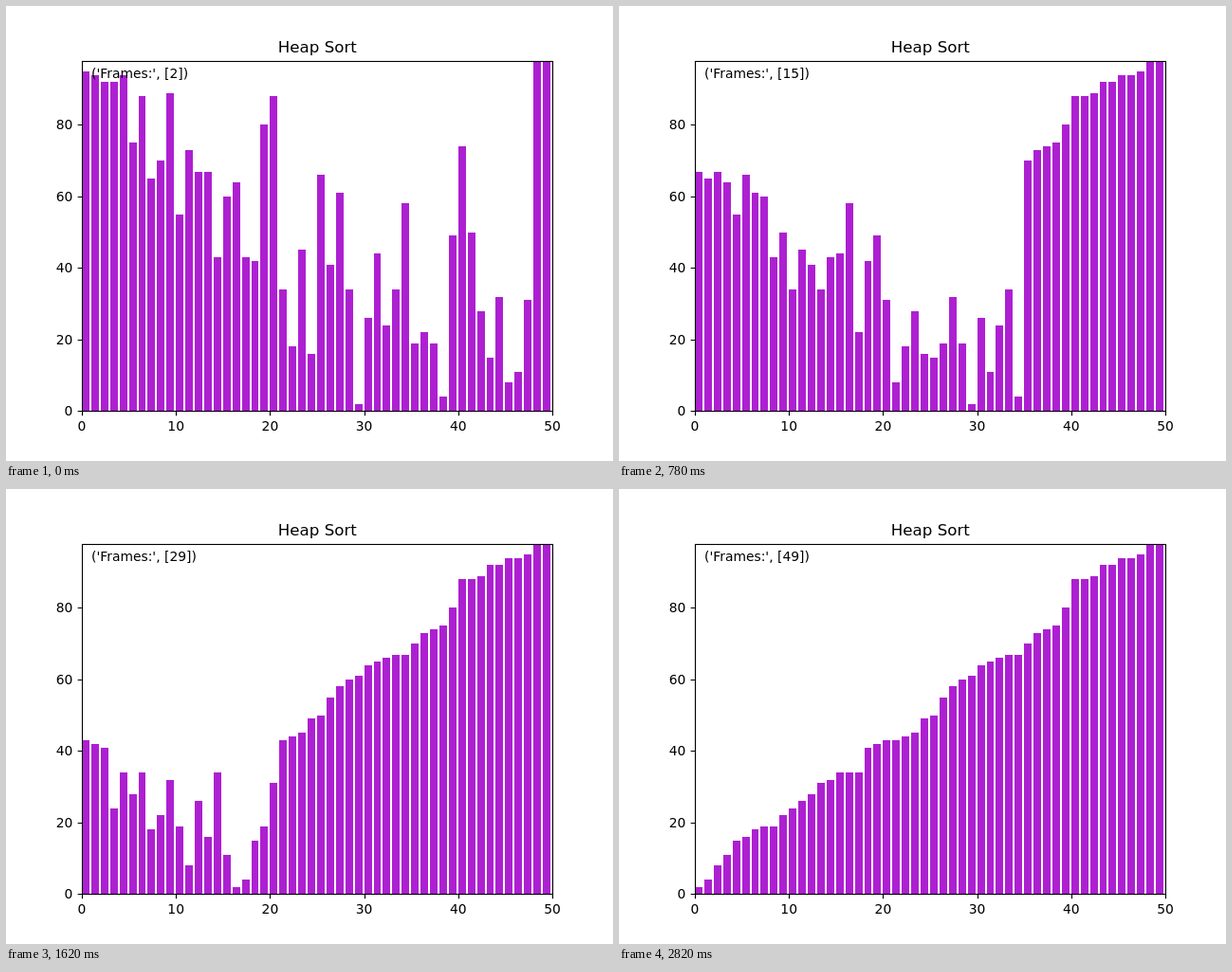
Write an HTML page that moves like this. It is 640 px wide and 480 px high and loops after 2880 ms.

```html
<!DOCTYPE html>
<html lang="en">
<head>
<meta charset="utf-8">
<title>Heap Sort</title>
<style>
  html, body { margin: 0; width: 100%; height: 100%; overflow: hidden; background: #fff; }
  svg { display: block; width: 640px; height: 480px; }
  text { font: 13.889px "DejaVu Sans", Verdana, sans-serif; fill: #000; }
  .title { font-size: 16.667px; }
  .axes { fill: none; stroke: #000; stroke-width: 1.111; }
</style>
</head>
<body>
<svg viewBox="0 0 640 480">
  <g id="bars" fill="#ad20d1"></g>
  <path id="ticks" class="axes"/>
  <rect class="axes" x="80.5" y="58.5" width="496" height="369"/>
  <g id="labels"></g>
  <text class="title" x="328.3" y="49" text-anchor="middle">Heap Sort</text>
  <text id="counter" x="90" y="76"></text>
</svg>
<script>
const STEP = 60;
const FIRST_LABEL = 2;
const LEFT = 80, BOTTOM = 427.2, UNIT_X = 9.92, UNIT_Y = 369.6 / 98;

// A max-heap of 48 values followed by two already sorted ones.
const start = [
  95, 94, 92, 92, 94, 75, 88, 65, 70, 89,
  55, 73, 67, 67, 43, 60, 64, 43, 42, 80,
  88, 34, 18, 45, 16, 66, 41, 61, 34, 2,
  26, 44, 24, 34, 58, 19, 22, 19, 4, 49,
  74, 50, 28, 15, 32, 8, 11, 31, 98, 98
];

const byId = id => document.getElementById(id);
const xAt = i => LEFT + i * UNIT_X;
const yAt = v => BOTTOM - v * UNIT_Y;

function add(parent, tag, attrs, text = "") {
  const node = document.createElementNS("http://www.w3.org/2000/svg", tag);
  for (const key in attrs) node.setAttribute(key, attrs[key]);
  node.textContent = text;
  return parent.appendChild(node);
}

function swap(a, i, j) {
  [a[i], a[j]] = [a[j], a[i]];
}

function siftDown(a, size, root) {
  let largest = root;
  for (const child of [2 * root + 1, 2 * root + 2]) {
    if (child < size && a[child] > a[largest]) largest = child;
  }
  if (largest !== root) {
    swap(a, root, largest);
    siftDown(a, size, largest);
  }
}

function sortStates() {
  const a = [...start];
  const states = [[...a]];
  for (let end = 47; end > 0; end--) {
    swap(a, 0, end);
    siftDown(a, end, 0);
    states.push([...a]);
  }
  return states;
}

function drawAxes() {
  const labels = byId("labels");
  let path = "";
  for (let v = 0; v <= 50; v += 10) {
    path += `M${Math.round(xAt(v)) + 0.5} 427.5v4.86`;
    add(labels, "text", { x: xAt(v), y: 448, "text-anchor": "middle" }, v);
  }
  for (let v = 0; v <= 80; v += 20) {
    const y = Math.round(yAt(v));
    path += `M80.5 ${y + 0.5}h-4.86`;
    add(labels, "text", { x: 70.3, y: y + 5, "text-anchor": "end" }, v);
  }
  byId("ticks").setAttribute("d", path);
}

const states = sortStates();
const bars = start.map((_, i) => {
  const x = Math.round(xAt(i));
  return add(byId("bars"), "rect", { x, width: Math.round(xAt(i + 0.8)) - x });
});
let shown = -1;

function render(time) {
  const index = Math.floor(time / STEP) % states.length;
  if (index === shown) return;
  shown = index;
  states[index].forEach((value, i) => {
    const y = Math.round(yAt(value));
    bars[i].setAttribute("y", y);
    bars[i].setAttribute("height", 427 - y);
  });
  byId("counter").textContent = `('Frames:', [${index + FIRST_LABEL}])`;
}

drawAxes();
render(0);
const origin = performance.now();
function tick() {
  render(performance.now() - origin);
  requestAnimationFrame(tick);
}
requestAnimationFrame(tick);
</script>
</body>
</html>
```
